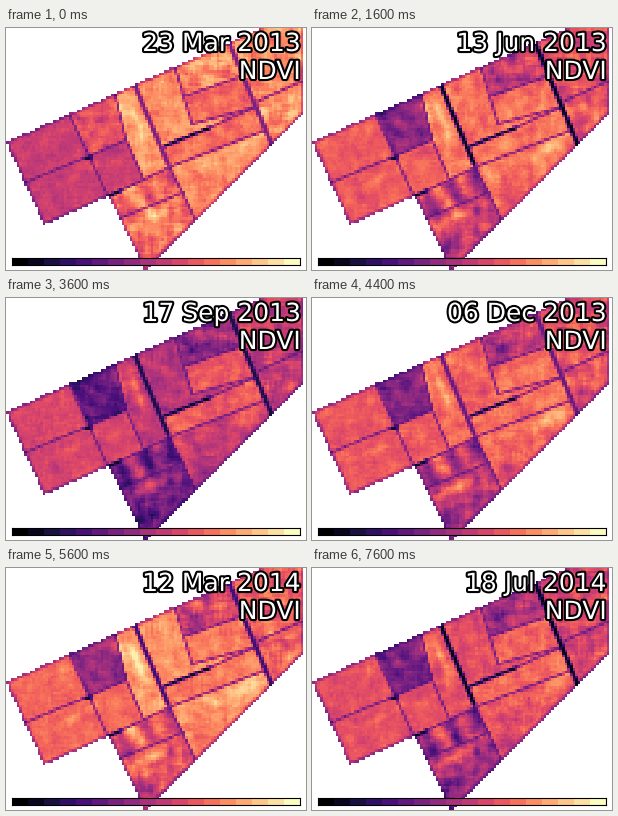
Write a matplotlib script that moves like this. It is 300 px wide and 242 px high and loops after 8 s.

```python
import numpy as np
import matplotlib.pyplot as plt
from matplotlib.animation import FuncAnimation
from matplotlib.path import Path
from matplotlib.patheffects import withStroke

W, H, COLS, ROWS = 300, 242, 114, 92
DATES = ("23 Mar 2013|10 Apr 2013|26 Apr 2013|28 May 2013|13 Jun 2013|29 Jun 2013|"
         "31 Jul 2013|16 Aug 2013|01 Sep 2013|17 Sep 2013|19 Oct 2013|06 Dec 2013|"
         "07 Jan 2014|08 Feb 2014|12 Mar 2014|13 Apr 2014|29 Apr 2014|31 May 2014|"
         "02 Jul 2014|18 Jul 2014").split("|")
CLOUD_FRAME = 16

gx, gy = np.meshgrid((np.arange(COLS) + 0.5) * W / COLS,
                     (np.arange(ROWS) + 0.5) * H / ROWS)
# Axes along and across the slope of the fields.
along = gx * 0.91 - gy * 0.41
across = gx * 0.41 + gy * 0.91

OUTLINE = [(0, 114), (108, 66), (255, 0), (298, -20), (298, 85),
           (139, 243), (103, 168), (38, 197), (0, 114)]
WIDE_ROADS = [[(129, 58), (162, 136)], [(222, 12), (267, 120)]]
DARK_ROADS = [[(159, 118), (203, 100)], [(103, 168), (114, 163)], [(81, 130), (85, 129)]]
THIN_ROADS = [
    [(20, 154), (83, 128), (120, 112)], [(64, 88), (83, 128), (101, 166)],
    [(109, 67), (120, 112), (137, 150)], [(114, 163), (166, 138), (260, 102)],
    [(162, 136), (190, 193)], [(115, 190), (178, 164)],
    [(168, 36), (186, 96), (249, 79)], [(203, 100), (249, 79)],
    [(177, 69), (236, 48)], [(248, 75), (299, 52)],
]

# Crop: level at the start, when dry and when lush, then roughness.
PASTURE = (.55, .58, .69, .025)
FALLOW = (.62, .28, .44, .05)
GRAIN = (.77, .51, .81, .04)
MIXED = (.77, .44, .61, .07)
CEREAL = (.69, .65, .74, .035)
MAIZE = (.78, .56, .82, .045)
SOUTH = (.70, .36, .66, .06)
EAST = (.77, .54, .68, .06)
FIELDS = [
    ((42, 121), PASTURE), ((60, 162), PASTURE), ((110, 139), PASTURE),
    ((93, 97), FALLOW), ((130, 100), GRAIN), ((163, 80), GRAIN),
    ((202, 45), MIXED), ((212, 74), CEREAL), ((206, 110), CEREAL),
    ((210, 145), MAIZE), ((142, 165), SOUTH), ((150, 205), SOUTH),
    ((265, 40), EAST), ((274, 85), EAST),
]


def line_distance(line):
    best = np.full(gx.shape, 1e9)
    for (x0, y0), (x1, y1) in zip(line, line[1:]):
        dx, dy = x1 - x0, y1 - y0
        t = np.clip(((gx - x0) * dx + (gy - y0) * dy) / (dx * dx + dy * dy), 0, 1)
        best = np.minimum(best, np.hypot(gx - x0 - t * dx, gy - y0 - t * dy))
    return best


def road_weight(lines, half):
    distance = np.min([line_distance(line) for line in lines], axis=0)
    return np.clip((half + 1.3 - distance) / 2.2, 0, 1)


def grow_fields(allowed, owner):
    """Spread each field's number to free neighbours until nothing changes."""
    while True:
        before = owner.copy()
        for step, axis in ((1, 0), (-1, 0), (1, 1), (-1, 1)):
            owner = np.where((owner < 0) & allowed, np.roll(owner, step, axis), owner)
        if np.array_equal(before, owner):
            return owner


def smooth_noise(seed, rx, ry):
    noise = np.random.default_rng(seed).normal(size=gx.shape)
    for axis, radius in ((1, rx), (0, ry)):
        noise = sum(np.roll(noise, k, axis) for k in range(-radius, radius + 1))
    return noise / noise.std()


def spot(x, y, length, width):
    u = along - (x * 0.91 - y * 0.41)
    v = across - (x * 0.41 + y * 0.91)
    return np.exp(-(u / length) ** 2 - (v / width) ** 2)


inside = Path(OUTLINE).contains_points(
    np.column_stack([gx.ravel(), gy.ravel()])).reshape(gx.shape)
edge = np.clip((3.4 - line_distance(OUTLINE)) / 2.4, 0, 1)
wide = road_weight(WIDE_ROADS, 2)
dark = road_weight(DARK_ROADS, 1.4)
thin = road_weight(THIN_ROADS, 0.7)

barrier = np.min([line_distance(r) for r in WIDE_ROADS + DARK_ROADS + THIN_ROADS], axis=0) < 1.9
owner = np.full(gx.shape, -1)
for number, ((x, y), _) in enumerate(FIELDS):
    owner[int(y * ROWS / H), int(x * COLS / W)] = number
owner = grow_fields(inside & ~barrier, owner)
owner = grow_fields(inside, owner)
start, dry, lush, rough = np.moveaxis(np.array([crop for _, crop in FIELDS])[owner], -1, 0)

streaks = (0.14 * spot(131, 92, 4, 26) + 0.16 * spot(112, 82, 4, 14)
           + 0.08 * spot(66, 151, 17, 4) + 0.15 * spot(213, 39, 8, 7)
           - 0.13 * spot(187, 50, 7, 10) + 0.10 * spot(243, 116, 18, 9)
           - 0.16 * spot(196, 172, 12, 14) + 0.22 * spot(142, 190, 17, 5)
           - 0.14 * spot(137, 221, 14, 12))
furrows = 0.13 * np.cos((along - 49) * 2 * np.pi / 27) * (owner == 10)
soil = smooth_noise(4, 1, 2)
clouds = (spot(103, 118, 13, 12) > 0.5) | (spot(40, 175, 12, 11) > 0.5)
shadow = 0.4 * spot(98, 114, 18, 13)


def pulse(frame, centre, spread):
    return np.exp(-((frame - centre) / spread) ** 2)


def field_values(frame):
    greenness = np.interp(frame, [4, 9, 12, 16, 19], [.65, 0, .8, 1, .35])
    young = max(0, 1 - frame / 4)
    value = dry + (lush - dry) * greenness
    value += (start - value) * young
    value += (streaks + furrows) * (1 - 0.5 * young)
    value += rough * 0.65 * (soil + smooth_noise(50 + frame, 2, 1))
    value += np.random.default_rng(frame).normal(0, 0.012, gx.shape)
    if frame == CLOUD_FRAME:
        value -= shadow
    damp = 0.05 + 0.3 * (pulse(frame, 0, 2) + pulse(frame, 12, 2.5))
    for weight, level in ((thin, 0.28), (wide, damp), (dark, 0.06)):
        value += (np.minimum(level, value) - value) * weight
    value *= 1 - 0.35 * edge
    hidden = ~inside | (clouds & (frame == CLOUD_FRAME))
    return np.ma.masked_array(np.clip(value, 0, 0.97), hidden)


fig = plt.figure(figsize=(W / 100, H / 100), dpi=100, facecolor="white")
ax = fig.add_axes([0, 0, 1, 1])
ax.axis("off")
cmap = plt.get_cmap("magma").copy()
cmap.set_bad("white")
style = dict(cmap=cmap, vmin=0, vmax=1, interpolation="nearest", aspect="auto")
image = ax.imshow(field_values(0), extent=(0, W, H, 0), **style)

bar = fig.add_axes([0.02, 0.02, 0.96, 0.03])
bar.imshow(np.linspace(0, 1, 18)[None], **style)
bar.set(xticks=[], yticks=[])


def label(y, text):
    return ax.text(295, y, text, color="white", family="DejaVu Sans", size=18,
                   ha="right", va="baseline", zorder=4,
                   path_effects=[withStroke(linewidth=3, foreground="black")])


date = label(23, DATES[0])
label(51, "NDVI")


def update(frame):
    image.set_data(field_values(frame))
    date.set_text(DATES[frame])
    return image, date


animation = FuncAnimation(fig, update, frames=len(DATES), interval=400,
                          repeat=True, repeat_delay=0, blit=False)
plt.show()
```
